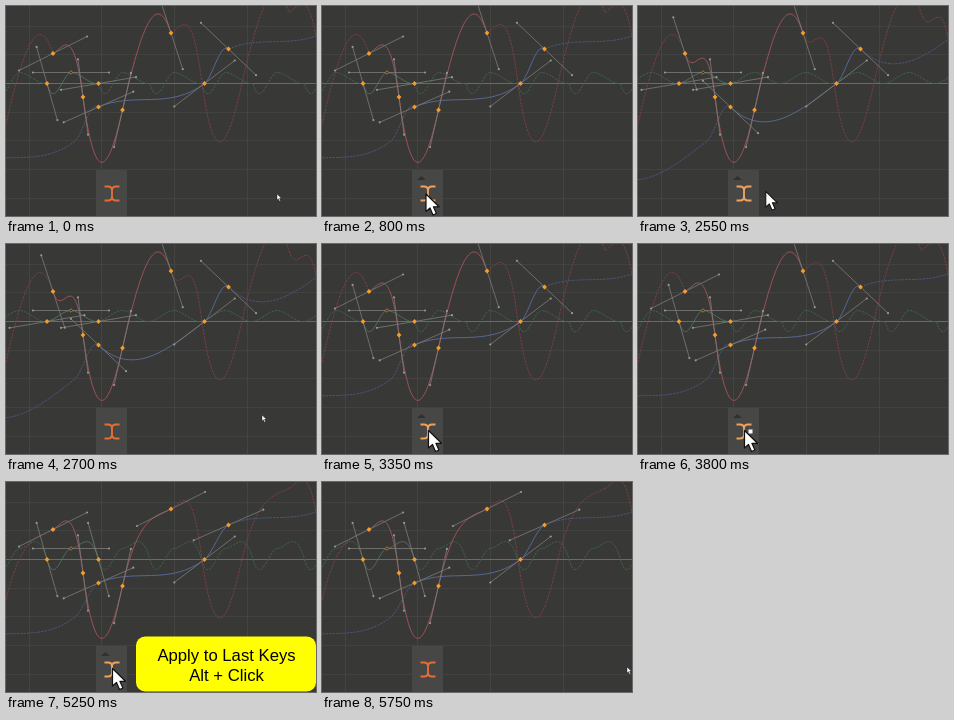
An HTML page that plays this animation: 310x210 px, repeating every 5850 ms.

```html
<!DOCTYPE html>
<html lang="en">
<head>
<meta charset="utf-8">
<title>Cyclic handles</title>
<style>
html, body { margin: 0; width: 100%; height: 100%; overflow: hidden; background: #383836; }
svg { display: block; width: 310px; height: 210px; }
text { font: 16.7px "Liberation Sans", Arial, sans-serif; text-anchor: middle; }
</style>
</head>
<body>
<svg id="stage" viewBox="0 0 310 210"></svg>
<script>
const LOOP = 5850, STEP = 50, TRAVEL = 200, HANDLE = 38;
const NS = "http://www.w3.org/2000/svg";
const stage = document.getElementById("stage");

function add(parent, tag, attrs, text) {
  const el = document.createElementNS(NS, tag);
  for (const key in attrs) el.setAttribute(key, attrs[key]);
  if (text) el.textContent = text;
  parent.appendChild(el);
  return el;
}
const show = (el, on) => el.setAttribute("display", on ? "inline" : "none");

// Grid
const gridLine = (d, stroke) => add(stage, "path", { d, stroke });
for (let x = 23; x < 310; x += 72.7) gridLine(`M${Math.floor(x) + 0.5} 0V210`, "#444442");
for (let i = -2; i <= 4; i++)
  gridLine(`M0 ${Math.floor(77.5 + i * 28.7) + 0.5}H310`, i ? "#424240" : "#6a6a67");

// Keys with slopes; each curve repeats with an offset beyond its first and last key
const key = (x, y, slope, hollow) => ({ x, y, slope, hollow });
const curves = [
  { solid: "#4d7561", dash: "#3e664f",
    keys: [key(41, 77.5, 3.52), key(65, 66.5, 0, true), key(92.5, 77.5, -0.17)] },
  { solid: "#596da0", dash: "#4d597e",
    keys: [key(92.5, 101, -0.44), key(198.5, 77.5, -0.76), key(222.5, 43, 0.95)] },
  { solid: "#a8555d", dash: "#7e4047",
    keys: [key(47, 47.5, -0.5), key(77, 91, 7.5), key(116.5, 104, -4.4), key(165, 27, 3.08)] }
];

// Copies the slope of one end key to the other
function matchEnds(keys, state) {
  const out = keys.map(k => ({ ...k }));
  const first = out[0], last = out[out.length - 1];
  if (state === "first") first.slope = last.slope;
  if (state === "last") last.slope = first.slope;
  return out;
}

// Hermite spline written as cubic Béziers
function spline(keys) {
  return keys.map((b, i) => {
    if (!i) return `M${b.x} ${b.y}`;
    const a = keys[i - 1], h = (b.x - a.x) / 3;
    return `C${a.x + h} ${a.y + h * a.slope} ${b.x - h} ${b.y - h * b.slope} ${b.x} ${b.y}`;
  }).join("");
}

const diamond = (x, y, r) => `M${x} ${y - r}L${x + r} ${y}L${x} ${y + r}L${x - r} ${y}Z`;

function drawHandles(g, { x, y, slope }) {
  const dx = HANDLE / Math.hypot(1, slope), dy = dx * slope;
  add(g, "path", { d: `M${x - dx} ${y - dy}L${x + dx} ${y + dy}`, stroke: "#7c7c79", "stroke-width": 0.8 });
  for (const s of [-1, 1]) add(g, "circle", { cx: x + s * dx, cy: y + s * dy, r: 1.1, fill: "#979794" });
}

function drawKey(g, { x, y, hollow }) {
  add(g, "path", hollow
    ? { d: diamond(x, y, 1.8), fill: "#38352f", stroke: "#d08a30", "stroke-width": 0.8 }
    : { d: diamond(x, y, 2.4), fill: "#f99c27" });
}

function buildGraph(state) {
  const g = add(stage, "g", { fill: "none" });
  const all = [];
  for (const { solid, dash, keys } of curves) {
    const set = matchEnds(keys, state), d = spline(set);
    const first = set[0], last = set[set.length - 1];
    const dx = last.x - first.x, dy = last.y - first.y;
    for (let n = -2; n <= 5; n++) {
      add(g, "path", {
        d, transform: `translate(${n * dx} ${n * dy})`, "stroke-width": 0.9,
        stroke: n ? dash : solid, "stroke-dasharray": n ? "2.5 1" : "none"
      });
    }
    all.push(...set);
  }
  all.forEach(k => drawHandles(g, k));
  all.forEach(k => drawKey(g, k));
  return g;
}
const graphs = {};
for (const state of ["base", "first", "last"]) graphs[state] = buildGraph(state);

// Button panel
add(stage, "rect", { x: 90, y: 164, width: 31, height: 46, fill: "#474745" });
const arrow = add(stage, "path", { d: "M95 174L99.5 170L104 174Z", fill: "#30302f" });
const plate = add(stage, "rect", { x: 94, y: 175, width: 24, height: 24, rx: 1, fill: "#f3a17c" });
const beam = "M98.5 180.5H102Q106 180.5 106 184.5V190.5Q106 194.5 102 194.5H98.5" +
  "M113.5 180.5H110Q106 180.5 106 184.5V190.5Q106 194.5 110 194.5H113.5";
const outline = add(stage, "path", { d: beam, fill: "none", stroke: "#4b3026", "stroke-width": 3.8 });
const icon = add(stage, "path", { d: beam, fill: "none", "stroke-width": 1.9 });
const square = x => add(stage, "rect", { x, y: 185.5, width: 4, height: 4 });

// Label
const label = add(stage, "g", {});
add(label, "rect", { x: 130, y: 154.5, width: 180, height: 55, rx: 9, fill: "#ffff00" });
const title = add(label, "text", { x: 220.5, y: 179 });
const combo = add(label, "text", { x: 220.5, y: 199 });

const cursor = add(stage, "path", {
  d: "M0 0V17.5L4 14L7 21L10.4 19.5L7.4 12.8H13Z",
  fill: "#fff", stroke: "#111", "stroke-width": 1.2, "stroke-linejoin": "round"
});

// Each visit: the pointer arrives, a modifier is held, the button is pressed, the pointer leaves
const visits = [
  { result: "first", title: "Apply to First Keys", combo: "Shift + Click", mark: square(97.5),
    from: [271, 188], spot: [104, 188], to: [256, 171],
    start: 0, hold: 1050, hint: 1050, press: 1750, copy: 1850, release: 1900, drop: 2350, leave: 2500 },
  { result: "last", title: "Apply to Last Keys", combo: "Alt + Click", mark: square(110.5),
    from: [256, 171], spot: [106.5, 186.5], to: [305, 185],
    start: 3000, hold: 3650, hint: 3850, press: 4550, copy: 4750, release: 4750, drop: 5250, leave: 5450 }
];

const ease = u => u * u * (3 - 2 * u);
const progress = (t, start) => ease(Math.min(1, Math.max(0, (t - start) / TRAVEL)));
const mix = (a, b, k) => a + (b - a) * k;

function draw(time) {
  const t = Math.floor(time % LOOP / STEP) * STEP;
  const v = t > visits[1].start ? visits[1] : visits[0];
  const within = (a, b) => t >= a && t < b;

  const state = t >= v.copy ? v.result : "base";
  for (const name in graphs) show(graphs[name], name === state);

  const arriving = progress(t, v.start), leaving = progress(t, v.leave);
  const near = arriving - leaving;
  const hover = near > 0.8, pressed = within(v.press, v.release);
  show(arrow, hover);
  show(plate, pressed);
  show(outline, pressed);
  icon.setAttribute("stroke", pressed ? "#ffb087" : hover ? "#f0a15c" : "#e66c35");

  for (const { mark } of visits) show(mark, mark === v.mark && within(v.hold, v.drop));
  v.mark.setAttribute("fill", pressed ? "#ffc09c" : "#fff");
  v.mark.setAttribute("stroke", pressed ? "#4b3026" : "none");

  show(label, within(v.hint, v.leave + STEP));
  title.textContent = v.title;
  combo.textContent = v.combo;

  const [x, y] = v.spot.map((p, i) => mix(mix(v.from[i], p, arriving), v.to[i], leaving));
  cursor.setAttribute("transform", `translate(${x} ${y}) scale(${mix(0.34, 1, near)})`);
}

const begin = performance.now();
function tick() {
  draw(performance.now() - begin);
  requestAnimationFrame(tick);
}
tick();
</script>
</body>
</html>
```
